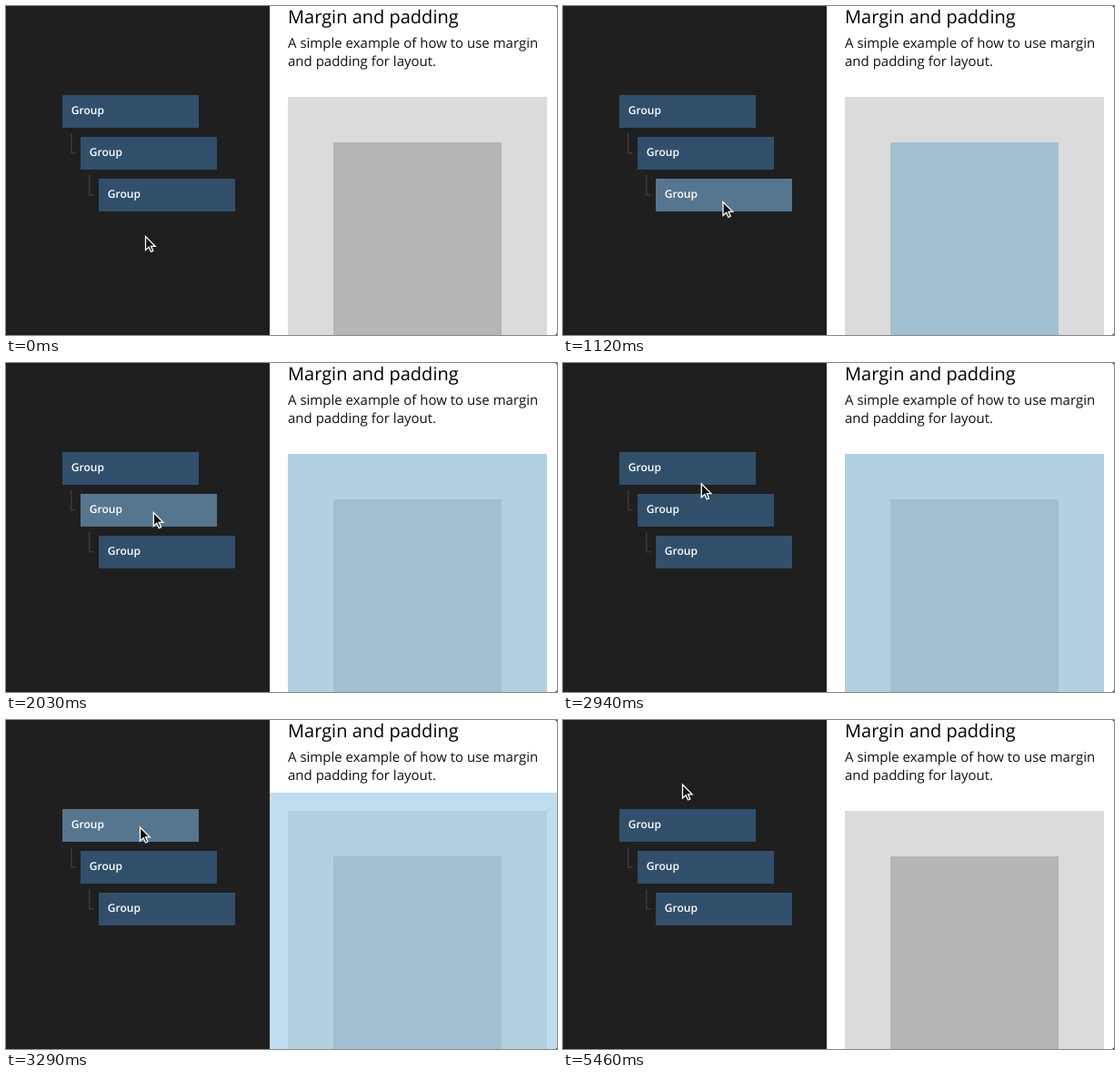
Recreate the animation shown at these times as an HTML page with a canvas. Size 606 by 362 pixels, loop 6.16 s.

```html
<!DOCTYPE html>
<html lang="en">
<head>
<meta charset="utf-8">
<title>Margin and padding</title>
<style>
  html, body { margin: 0; width: 100%; height: 100%; overflow: hidden; background: #1f1f1f; }
  canvas { display: block; width: 606px; height: 362px; }
</style>
</head>
<body>
<canvas></canvas>
<script>
const LOOP = 6160, STEP = 70, MOVE = 490, LAG = 2 * STEP;
const W = 606, H = 362;
const canvas = document.querySelector('canvas');
const ctx = canvas.getContext('2d');
const ratio = window.devicePixelRatio || 1;
canvas.width = W * ratio;
canvas.height = H * ratio;
ctx.scale(ratio, ratio);
ctx.textRendering = 'geometricPrecision';

const home = { x: 153.5, y: 253.5 };
const moves = [
  { start: 280, x: 176, y: 215.5 },
  { start: 1610, x: 162, y: 163.5 },
  { start: 2730, x: 147.5, y: 118 },
  { start: 4760, x: 131.5, y: 71 }
];

// Each nested group is hovered from enter to leave
const groups = [
  { enter: 3080, leave: 4900 },
  { enter: 1750, leave: 2940 },
  { enter: 630, leave: 1750 }
];

const hovered = (group, t) => t >= group.enter && t < group.leave;
const previewed = (group, t) => hovered(group, t - LAG);
// The outline flashes just before the preview catches up
const flashing = (group, t) => hovered(group, t - STEP) !== previewed(group, t);
const easeOut = k => 1 - (1 - k) ** 2;

function rect(color, x, y, w, h) {
  ctx.fillStyle = color;
  ctx.fillRect(x, y, w, h);
}

function text(string, x, y, font, color) {
  ctx.font = `${font} "Open Sans", sans-serif`;
  ctx.fillStyle = color;
  ctx.fillText(string, x, y);
}

function drawGroup(group, level, t) {
  const x = 62 + 20 * level, y = 98 + 46 * level;
  if (level) {
    rect('#3b3b3b', x - 11, y - 4, 1.5, 22);
    rect('#3b3b3b', x - 11, y + 17, 5.5, 1.5);
  }
  rect(hovered(group, t) ? '#56758f' : '#314f6b', x, y, 150, 36);
  if (flashing(group, t)) {
    ctx.strokeStyle = '#fff';
    ctx.lineWidth = 2;
    ctx.strokeRect(x, y, 150, 36);
  }
  text('Group', x + 9.8, y + 21, '600 12px', '#fff');
}

function drawPage(t) {
  const [page, outer, inner] = groups.map(group => previewed(group, t));
  ctx.save();
  ctx.beginPath();
  ctx.roundRect(290, 0, 316, H, [0, 3, 3, 0]);
  ctx.clip();
  rect('#fff', 290, 0, 316, H);
  if (page) rect('#c1ddf0', 290, 80, 316, 282);
  rect(page || outer ? '#b3d0e1' : '#dbdbdb', 310, 100, 285, 262);
  rect(page || outer || inner ? '#a2c0d2' : '#b5b5b5', 360, 150, 185, 212);
  ctx.restore();
  text('Margin and padding', 310, 19, '20px', '#000');
  text('A simple example of how to use margin', 310, 46, '15px', '#111');
  text('and padding for layout.', 310, 66, '15px', '#111');
}

const arrow = new Path2D('M0 0V15L3.6 11.8L6 17L8.3 16L6 10.8H10.6Z');

function drawCursor(t) {
  let { x, y } = home;
  for (const move of moves) {
    const k = easeOut(Math.min(Math.max((t - move.start) / MOVE, 0), 1));
    x += (move.x - x) * k;
    y += (move.y - y) * k;
  }
  ctx.save();
  ctx.translate(x, y);
  ctx.fillStyle = '#111';
  ctx.strokeStyle = '#fff';
  ctx.lineWidth = 1.3;
  ctx.fill(arrow);
  ctx.stroke(arrow);
  ctx.restore();
}

function draw() {
  const t = Math.floor(performance.now() % LOOP / STEP) * STEP;
  rect('#1f1f1f', 0, 0, W, H);
  groups.forEach((group, level) => drawGroup(group, level, t));
  drawPage(t);
  drawCursor(t);
  requestAnimationFrame(draw);
}
draw();
</script>
</body>
</html>
```
